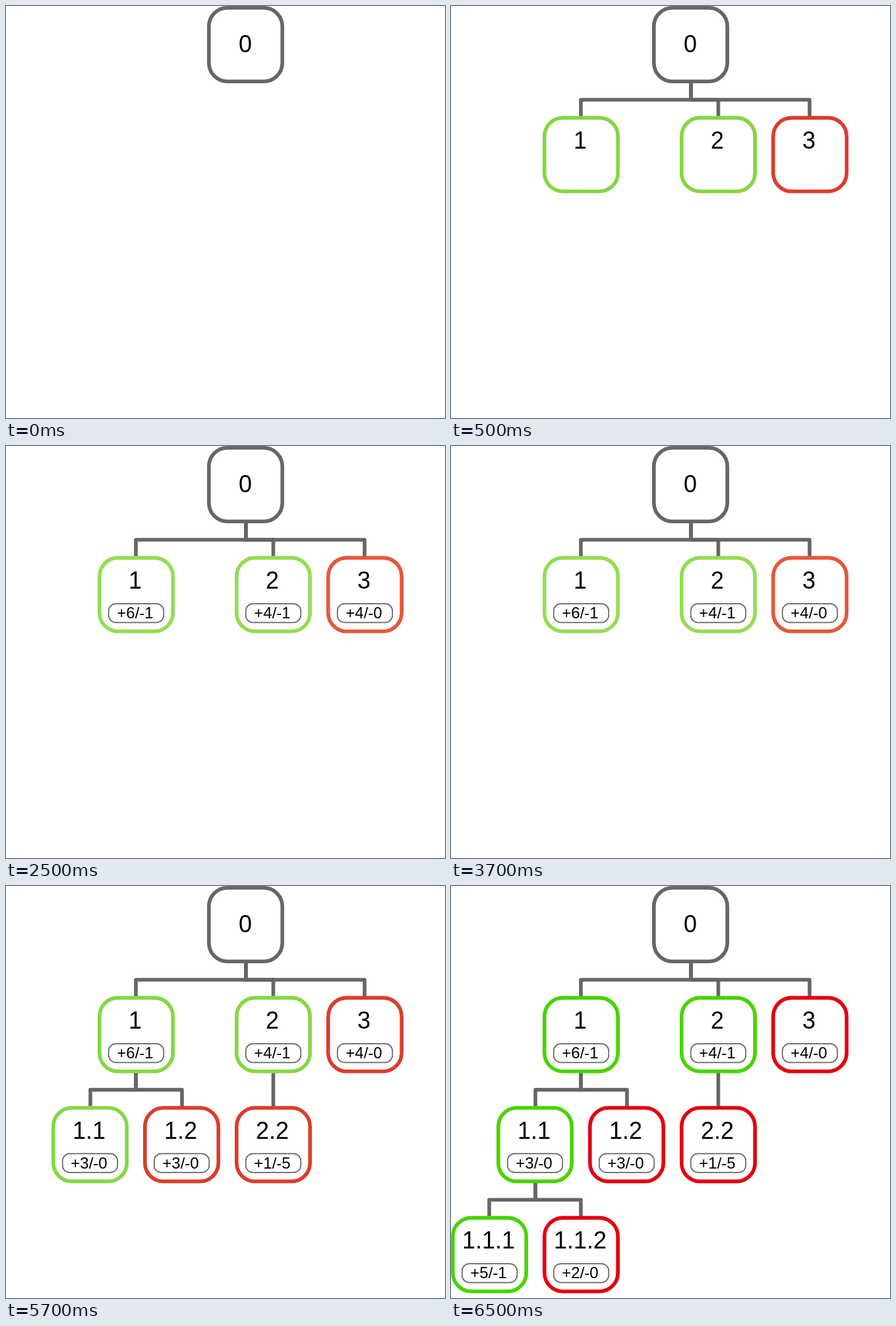
These frames come from a looping animation (666x624 px, 8 s). An HTML page:

```html
<!DOCTYPE html>
<html>
<head>
<meta charset="utf-8">
<style>
html, body { margin: 0; width: 100%; height: 100%; overflow: hidden; background: #fff; }
svg { display: block; width: 666px; height: 624px; }
text { font-family: "Liberation Sans", Arial, sans-serif; font-size: 36px; text-anchor: middle; }
.count { font-size: 24px; }
.box { fill: #fff; stroke: #666; stroke-width: 5.6; }
.good { stroke: var(--good); }
.bad { stroke: var(--bad); }
.pill { fill: #fff; stroke: #666; stroke-width: 1.7; }
.link { fill: none; stroke: #666; stroke-width: 5.6; stroke-linejoin: round; }
</style>
</head>
<body>
<svg id="tree" viewBox="0 0 666 624"></svg>
<script>
const svg = document.getElementById("tree");
const LOOP = 8000;

// [label, centre x, level, kind, count]
const nodes = [
  ["0", 363.5, 0, "", ""],
  ["1", 197.5, 1, "good", "+6/-1"],
  ["2", 405.5, 1, "good", "+4/-1"],
  ["3", 544.5, 1, "bad", "+4/-0"],
  ["1.1", 127.5, 2, "good", "+3/-0"],
  ["1.2", 266.5, 2, "bad", "+3/-0"],
  ["2.2", 405.5, 2, "bad", "+1/-5"],
  ["1.1.1", 58.5, 3, "good", "+5/-1"],
  ["1.1.2", 197.5, 3, "bad", "+2/-0"]
];
// [parent x, parent level, child x]
const links = [
  [364, 0, 197], [364, 0, 405.5], [364, 0, 544],
  [197, 1, 128], [197, 1, 267], [405.5, 1, 405.5],
  [128, 2, 58], [128, 2, 197]
];
// [start, deepest level, counts shown, green, red]
const stages = [
  [0, 0, false, "#84d644", "#dc3c2c"],
  [500, 1, false, "#84d644", "#dc3c2c"],
  [2500, 1, true, "#94dc54", "#e4583c"],
  [4500, 2, true, "#84d844", "#dc3c2c"],
  [6500, 3, true, "#48d400", "#e2000f"]
];

const midY = level => 58.5 + level * 166.6;

function rect(cls, x, y, w, h, r) {
  return `<rect class="${cls}" x="${x - w / 2}" y="${y - h / 2}" width="${w}" height="${h}" rx="${r}"/>`;
}

function link([x, level, childX]) {
  const y = midY(level);
  return `<path class="link" d="M${x} ${y + 55}V${y + 83.5}H${childX}V${y + 112}"/>`;
}

function node([label, x, level, kind, count], counts) {
  const y = midY(level);
  let out = rect("box " + kind, x, y, 111.4, 111.4, 28);
  out += `<text x="${level ? x - 1.5 : x - 0.5}" y="${y + (level ? -9 : 11.5)}">${label}</text>`;
  if (count && counts) {
    out += rect("pill", x, y + 28, 83.5, 28.5, 11);
    out += `<text class="count" x="${x - 1.5}" y="${y + 36}">${count}</text>`;
  }
  return out;
}

let shown = null;
function draw(now) {
  const t = now % LOOP;
  const stage = stages.findLast(s => s[0] <= t);
  if (stage !== shown) {
    shown = stage;
    const [, depth, counts, good, bad] = stage;
    svg.style.setProperty("--good", good);
    svg.style.setProperty("--bad", bad);
    svg.innerHTML =
      links.filter(l => l[1] < depth).map(link).join("") +
      nodes.filter(n => n[2] <= depth).map(n => node(n, counts)).join("");
  }
  requestAnimationFrame(tick);
}

const start = performance.now();
function tick() {
  draw(performance.now() - start);
}
tick();
</script>
</body>
</html>
```
